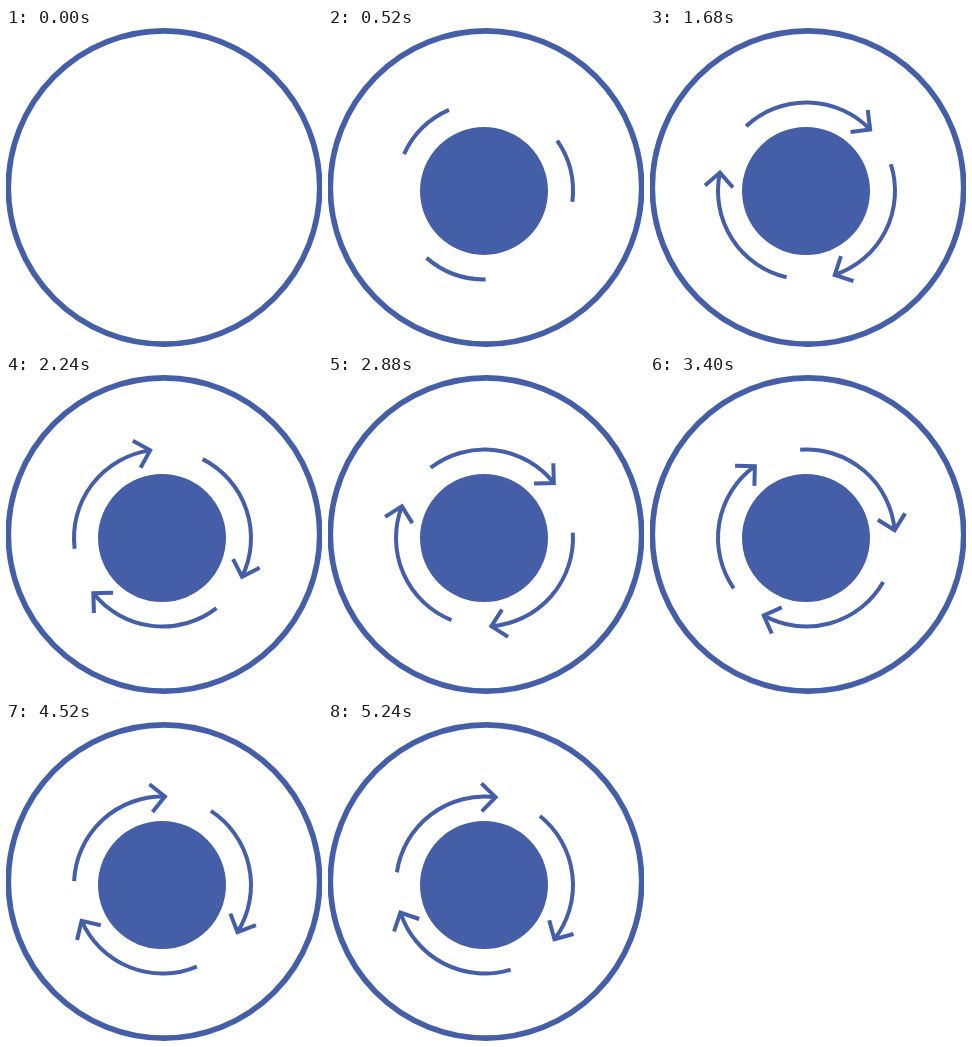
Write an HTML page with a canvas that moves like this. It is 316 by 319 pixels and loops after 5280 ms.

```html
<!DOCTYPE html>
<html lang="en">
<head>
<meta charset="utf-8">
<title>Rotating arrows</title>
<style>
html, body { margin: 0; width: 100%; height: 100%; overflow: hidden; background: #fff; }
canvas { display: block; }
</style>
</head>
<body>
<canvas id="stage" width="316" height="319"></canvas>
<script>
const ctx = document.getElementById('stage').getContext('2d');
const LOOP = 5280, STEP = 40, TURN = 5240;
const COLOR = '#455ea8';
const RADIUS = 88.5, SPAN = 89, START = 161.8;
const OFFSETS = [0, 115.4, 236];
const rad = deg => deg * Math.PI / 180;
const ramp = (t, from, to) => Math.min(1, Math.max(0, (t - from) / (to - from)));

// cubic-bezier(.28, 0, .34, 1), solved by bisection
function ease(x) {
  let lo = 0, hi = 1, s = 0.5;
  for (let i = 0; i < 30; i++) {
    s = (lo + hi) / 2;
    const bx = 3 * (1 - s) * (1 - s) * s * 0.28 + 3 * (1 - s) * s * s * 0.34 + s ** 3;
    if (bx < x) lo = s; else hi = s;
  }
  return s * s * (3 - 2 * s);
}

function arrow(tip, grow, head) {
  ctx.save();
  ctx.rotate(rad(tip));
  ctx.beginPath();
  ctx.arc(0, 0, RADIUS, rad(-SPAN), rad(-SPAN * (1 - grow)));
  ctx.stroke();
  if (head > 0) {
    ctx.beginPath();
    ctx.moveTo(RADIUS - 15.8 * head, -11.9 * head);
    ctx.lineTo(RADIUS, 0);
    ctx.lineTo(RADIUS + 11.9 * head, -15.8 * head);
    ctx.stroke();
  }
  ctx.restore();
}

function draw(t) {
  ctx.clearRect(0, 0, 316, 319);
  ctx.strokeStyle = ctx.fillStyle = COLOR;
  ctx.lineWidth = 5.6;
  ctx.beginPath();
  ctx.ellipse(158, 159.5, 155.7, 156.6, 0, 0, 2 * Math.PI);
  ctx.stroke();
  if (t === 0) return;

  const size = 1 - (1 - ramp(t, 0, 560)) ** 3;
  ctx.beginPath();
  ctx.arc(156, 163, 64 * size, 0, 2 * Math.PI);
  ctx.fill();

  const angle = START + 360 * ease(ramp(t, 0, TURN));
  const grow = ramp(t, 0, 760) ** 2;
  const head = ramp(t, 680, 800);
  ctx.lineWidth = 4;
  ctx.save();
  ctx.translate(156.5, 163);
  for (const offset of OFFSETS) arrow(angle + offset, grow, head);
  ctx.restore();
}

const begin = performance.now();
function tick() {
  const t = (performance.now() - begin) % LOOP;
  draw(Math.floor(t / STEP) * STEP);
  requestAnimationFrame(tick);
}
tick();
</script>
</body>
</html>
```
